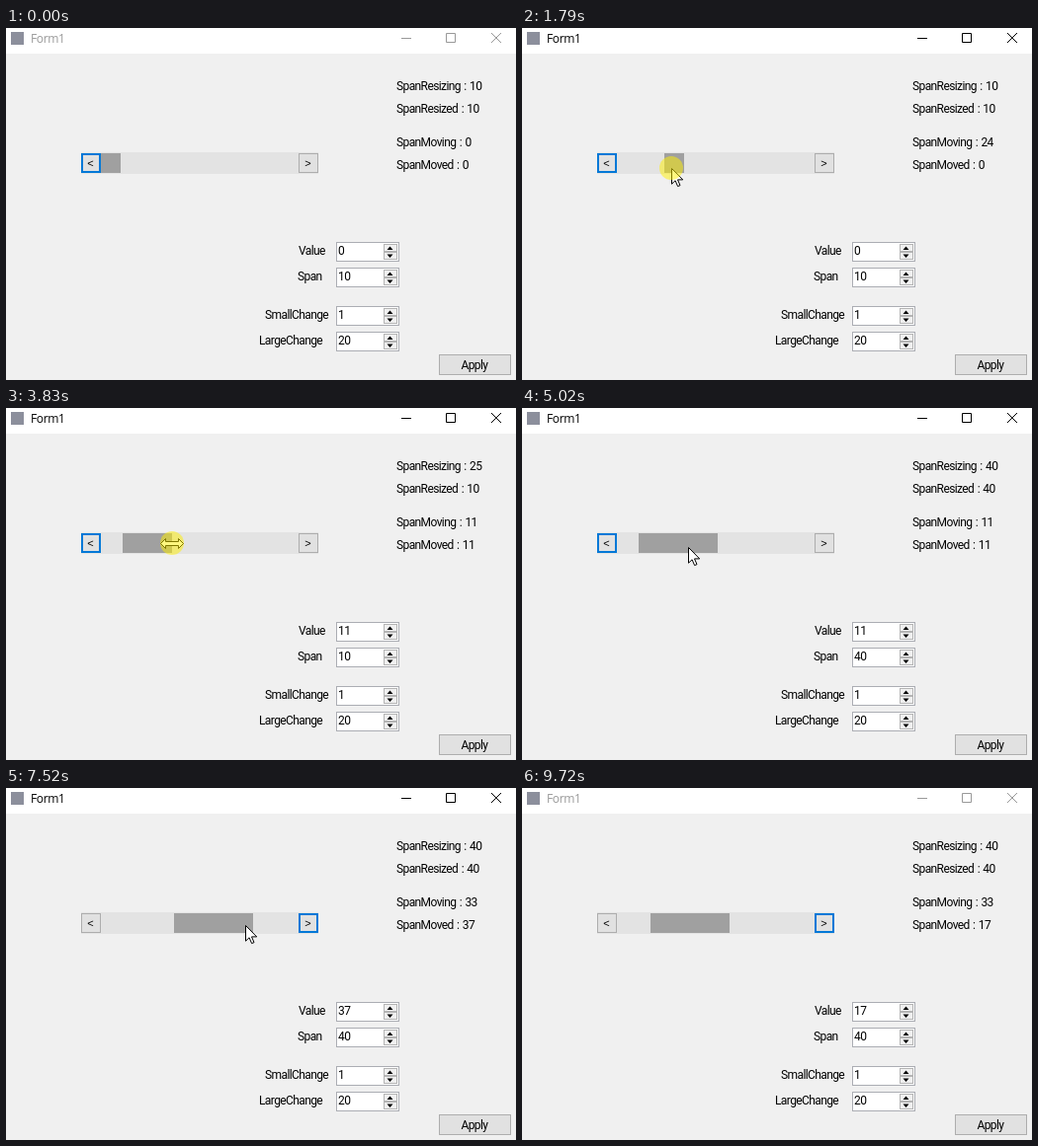
Animation, 516 px wide and 357 px high, one loop 9780 ms. Source, as an HTML page:

```html
<!DOCTYPE html>
<html lang="en">
<head>
<meta charset="utf-8">
<title>Form1</title>
<style>
  html, body { margin: 0; width: 100%; height: 100%; overflow: hidden; background: #f0f0f0; }
  svg { display: block; }
  text { font: 12px Roboto, "Liberation Sans", sans-serif; letter-spacing: -.6px; word-spacing: 1px; fill: #000; white-space: pre; }
  #title text { font: 12px "Open Sans", "Noto Sans", sans-serif; letter-spacing: -.4px; }
  #title path { fill: none; stroke: #000; }
  #title.idle text { fill: #999; }
  #title.idle path { stroke: #999; }
  .btn rect { y: 127.5px; width: 19px; height: 19px; fill: #e1e1e1; stroke: #adadad; }
  .btn text { font: 11px "Liberation Sans", Arial, sans-serif; text-anchor: middle; letter-spacing: 0; }
  .btn.focus rect { y: 128px; width: 18px; height: 18px; stroke: #0078d7; stroke-width: 2; transform: translateX(.5px); }
  .btn.hover rect { fill: #e5f1fb; stroke: #0078d7; }
  .btn.press rect { fill: #cce4f7; stroke: #005499; }
  .spin { fill: #f0f0f0; stroke: #b4b4b4; }
</style>
</head>
<body>
<svg width="516" height="357" viewBox="0 0 516 357">
  <rect width="516" height="357" fill="#f0f0f0"/>
  <rect width="516" height="26" fill="#fff"/>
  <g id="title">
    <rect x="5" y="4" width="13" height="13" fill="#8c8f9c"/>
    <text x="25" y="15">Form1</text>
    <path d="M400 10.5h10M445.5 5.5h9v9h-9z"/>
    <path d="M491 5l10 10M501 5l-10 10"/>
  </g>
  <rect x="76" y="126" width="240" height="22" fill="#e3e3e3"/>
  <rect id="thumb" y="127" height="20" fill="#a0a0a0"/>
  <g id="left" class="btn"><rect x="76.5"/><text x="85.5" y="141">&lt;</text></g>
  <g id="right" class="btn"><rect x="296.5"/><text x="305.5" y="141">&gt;</text></g>
  <g id="form"></g>
  <rect x="438.5" y="331.5" width="72" height="20" fill="#e1e1e1" stroke="#adadad"/>
  <text x="460.5" y="346">Apply</text>
  <g id="mouse">
    <path id="arrow" fill="#fff" stroke="#000" d="M.5 .5V16.2L4.1 12.8 6.6 18.6 9 17.6 6.5 11.9H11.7Z"/>
    <path id="sizer" fill="#fff" stroke="#000" d="M-11.5 .5L-6.5 -4.5V-1.5H6.5V-4.5L11.5 .5 6.5 5.5V2.5H-6.5V5.5Z"/>
    <circle id="glow" r="12" fill="#fff000" fill-opacity=".5"/>
  </g>
</svg>
<script>
const LOOP = 9780, TICK = 65;
const $ = id => document.getElementById(id);

function add(parent, tag, attrs, text = '') {
  const el = document.createElementNS('http://www.w3.org/2000/svg', tag);
  for (const k in attrs) el.setAttribute(k, attrs[k]);
  el.textContent = text;
  return parent.appendChild(el);
}

const label = (x, y, text) => add($('form'), 'text', { x, y }, text);

// Numeric box with its label; returns the value text
function numeric(name, x, y, value) {
  const g = $('form');
  label(x, y + 13, name);
  add(g, 'rect', { x: 334.5, y: y + .5, width: 63, height: 19, fill: '#fff', stroke: '#abadb3' });
  for (const dy of [2.5, 10.5])
    add(g, 'rect', { x: 382.5, y: y + dy, width: 13, height: 7, class: 'spin' });
  add(g, 'path', { d: `M385.5 ${y + 8}h6l-3-3.5zM385.5 ${y + 12.5}h6l-3 3.5z` });
  return label(336, y + 13, value);
}

const out = {
  resizing: label(395, 63), resized: label(395, 86),
  moving: label(395, 120), moved: label(395, 143),
  value: numeric('Value', 296, 217), span: numeric('Span', 295, 243)
};
numeric('SmallChange', 262, 282, 1);
numeric('LargeChange', 256, 308, 20);

const ease = {
  lin: u => u,
  out: u => u * (2 - u),
  both: u => u * u * (3 - 2 * u)
};

// Pointer path: time, x, y, easing towards the next point
const path = [
  [220, 420, 334, 'both'], [1130, 104, 140, 'both'],
  [1725, 156, 142, 'lin'], [1790, 151, 142, 'out'], [2065, 126, 142, 'lin'],
  [2130, 131, 140, 'lin'], [2145, 131, 140, 'lin'], [2340, 142, 136, 'lin'],
  [2665, 142, 136, 'lin'], [2940, 137, 137, 'lin'], [3575, 137, 137, 'lin'],
  [3830, 168, 137, 'out'], [4355, 197, 139, 'lin'], [4625, 197, 139, 'both'],
  [5020, 168, 141, 'lin'], [5165, 168, 141, 'both'], [5615, 212, 141, 'lin'],
  [5825, 212, 141, 'both'], [6420, 309, 142, 'lin'], [7390, 309, 142, 'lin'],
  [7520, 242, 139, 'out'], [7910, 127, 135, 'lin'], [8535, 127, 135, 'both'],
  [9260, 430, 357, 'lin']
];
const presses = [[1130, 2065], [3500, 4420], [5230, 5680], [6540, 6610],
  [6810, 6880], [7000, 7070], [7200, 7260], [7980, 8120]];
const clicks = presses.slice(3, 7).map(p => p[0]);

function pointer(t) {
  const i = path.findLastIndex(p => p[0] <= t);
  if (i < 0 || i === path.length - 1) return null;
  const [t0, x0, y0, fn] = path[i], [t1, x1, y1] = path[i + 1];
  const u = ease[fn](Math.floor((t - t0) / TICK) * TICK / (t1 - t0));
  return { x: x0 + (x1 - x0) * u, y: y0 + (y1 - y0) * u };
}

function valueAt(t, x) {
  if (t < 1130) return 0;
  if (t < 2065) return Math.max(0, Math.round((x - 104) / 2));
  if (t < 5230) return 11;
  if (t < 5680) return Math.round((x - 146) / 2);
  return 33 + clicks.filter(c => t >= c).length - (t >= 7980 ? 20 : 0);
}

function spanAt(t, x) {
  if (t < 3500) return 10;
  return t < 4420 ? 10 + Math.round((x - 138) / 2) : 40;
}

function draw(t) {
  const p = pointer(t), x = p ? p.x : 0;
  const value = valueAt(t, x), span = spanAt(t, x);
  const down = presses.some(([a, b]) => t >= a && t < b);
  const moved = t < 2065 ? 0 : t < 5680 ? 11 : value;
  const resized = t < 4420 ? 10 : span;

  out.resizing.textContent = 'SpanResizing : ' + span;
  out.resized.textContent = 'SpanResized : ' + resized;
  out.moving.textContent = 'SpanMoving : ' + (t < 5680 ? value : 33);
  out.moved.textContent = 'SpanMoved : ' + moved;
  out.value.textContent = moved;
  out.span.textContent = resized;

  $('thumb').setAttribute('x', 96 + value * 2);
  $('thumb').setAttribute('width', span * 2);
  $('title').classList.toggle('idle', t < 1130 || t >= 9720);

  const onRight = t > 5825 && t < 7900 && x >= 296 && x < 316;
  $('left').classList.toggle('focus', t < 6540);
  $('right').classList.toggle('focus', t >= 6540);
  $('right').classList.toggle('hover', onRight);
  $('right').classList.toggle('press', onRight && down);

  const sizing = t >= 2800 && t < 4755;
  $('mouse').style.display = p ? '' : 'none';
  $('glow').style.display = down ? '' : 'none';
  $('arrow').style.display = sizing ? 'none' : '';
  $('sizer').style.display = sizing ? '' : 'none';
  if (p) $('mouse').setAttribute('transform', `translate(${Math.round(p.x)} ${Math.round(p.y)})`);
}

function frame() {
  draw(performance.now() % LOOP);
  requestAnimationFrame(frame);
}
frame();
</script>
</body>
</html>
```
